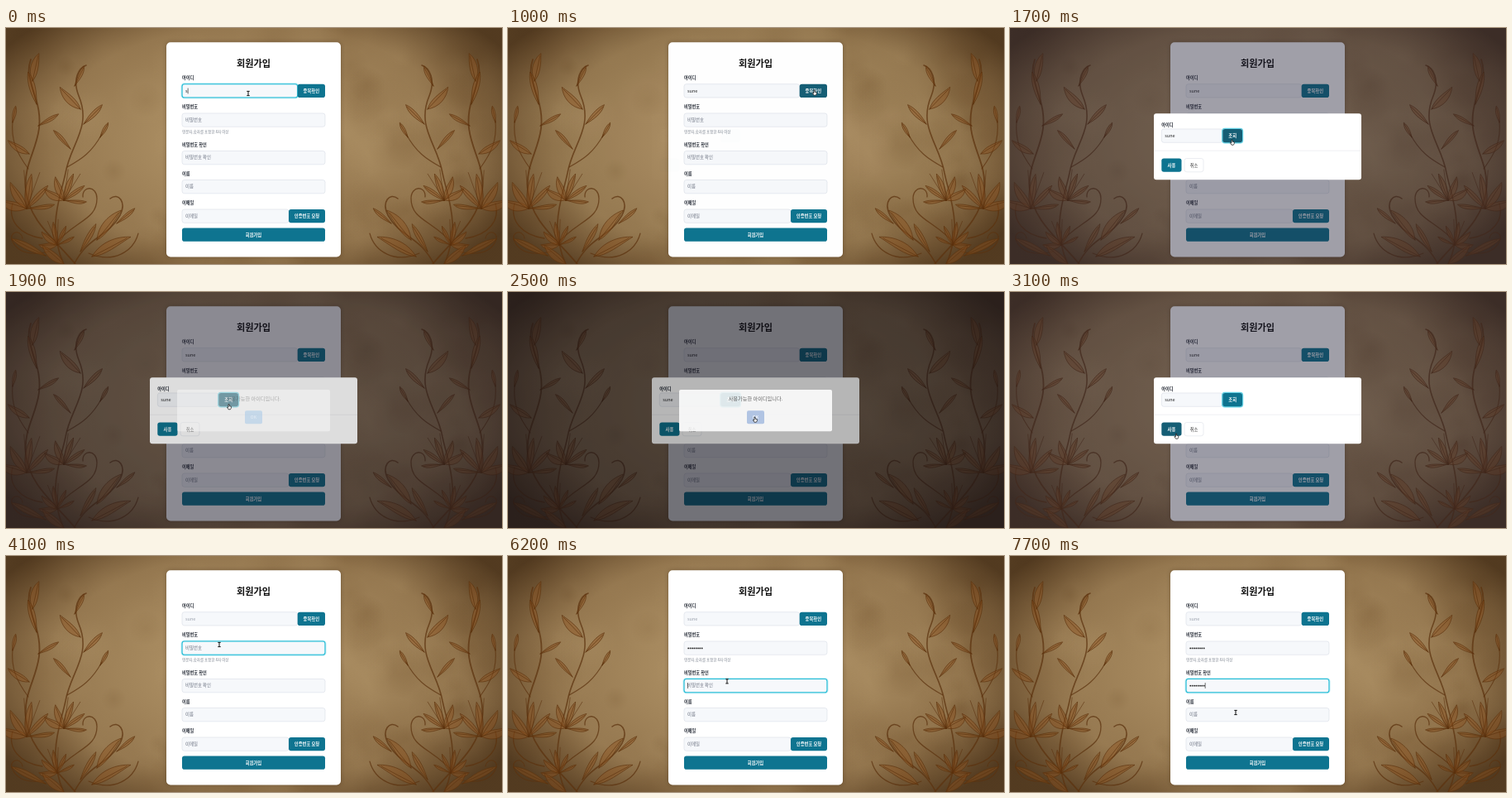
Recreate the animation shown at these times as an HTML page with a canvas. Size 600 by 285 pixels, loop 8 s.

```html
<!DOCTYPE html>
<html lang="ko">
<head>
<meta charset="utf-8">
<title>회원가입</title>
<style>
html, body { margin: 0; width: 100%; height: 100%; overflow: hidden; background: #8a6c45; }
canvas { display: block; width: 600px; height: 285px; }
</style>
</head>
<body>
<canvas id="stage"></canvas>
<script>
const W = 600, H = 285, LOOP = 8000;
const FONT = '"Noto Sans CJK KR", "Noto Sans CJK", "Noto Sans CJK JP", sans-serif';
const TEAL = '#0e7490', TEAL_DARK = '#155e75', CYAN = '#25bcd6';
const MEMBER = 'sune';

const scale = Math.max(1, window.devicePixelRatio || 1);
const stage = document.getElementById('stage');
stage.width = W * scale;
stage.height = H * scale;
const ctx = stage.getContext('2d');

const clamp = v => Math.max(0, Math.min(1, v));
const ramp = (t, a, b) => clamp((t - a) / (b - a));
const ease = p => p * p * (3 - 2 * p);
const countAt = (t, times) => times.filter(x => x <= t).length;

// ---------- parchment ----------
function leaf(g, x, y, deg, len, wide, bend = 0) {
  g.save();
  g.translate(x, y);
  g.rotate(deg * Math.PI / 180);
  g.beginPath();
  g.moveTo(0, 0);
  g.bezierCurveTo(len * .3, -wide + bend, len * .7, -wide + bend, len, bend);
  g.bezierCurveTo(len * .65, wide * .7 + bend, len * .3, wide * .7, 0, 0);
  g.fill();
  g.stroke();
  g.beginPath();
  g.moveTo(0, 0);
  g.quadraticCurveTo(len * .5, bend * .5, len * .9, bend);
  g.stroke();
  g.restore();
}

function lily(g, x, y, deg, size) {
  for (const d of [-62, 58, -32, 28, 0])
    leaf(g, x, y, deg + d, size * (1 - Math.abs(d) / 260), size * .15, d * size / 260);
  for (const d of [-12, 12]) {
    g.beginPath();
    g.moveTo(x, y);
    const a = (deg + d) * Math.PI / 180;
    g.lineTo(x + Math.cos(a) * size * 1.1, y + Math.sin(a) * size * 1.1);
    g.stroke();
  }
}

function vines(g) {
  const stem = (width, x, y, ...curve) => {
    g.lineWidth = width;
    g.beginPath();
    g.moveTo(x, y);
    for (let i = 0; i < curve.length; i += 6) g.bezierCurveTo(...curve.slice(i, i + 6));
    g.stroke();
  };
  g.lineCap = 'round';
  g.strokeStyle = 'rgba(92,50,14,.72)';
  g.fillStyle = 'rgba(140,82,30,.42)';
  stem(1.8, 88, 290, 60, 255, 28, 235, 24, 195, 20, 155, 52, 135, 36, 85, 30, 66, 24, 55, 30, 38);
  stem(1.6, 72, 290, 48, 240, 66, 205, 72, 175, 78, 140, 104, 120, 88, 82, 80, 62, 88, 48, 97, 45);
  stem(1.6, 80, 290, 98, 250, 122, 255, 138, 226, 146, 210, 136, 198, 126, 206);
  stem(1.3, 58, 262, 84, 232, 110, 232, 110, 206, 110, 190, 92, 190, 93, 204);
  stem(1.3, 44, 254, 16, 250, 2, 232, 8, 212);
  stem(1.2, 100, 272, 130, 285, 154, 270, 160, 248);
  stem(1.1, 74, 168, 92, 158, 104, 150, 116, 128);
  stem(1.1, 27, 170, 12, 150, 6, 135, 8, 112);
  stem(1.1, 52, 270, 30, 275, 15, 272, 8, 258, 2, 246, 18, 242, 20, 254);
  g.lineWidth = .8;
  lily(g, 25, 218, -82, 42);
  lily(g, 70, 208, -70, 34);
  lily(g, 62, 262, -100, 28);
  leaf(g, 37, 92, -112, 40, 7, 5);
  leaf(g, 32, 64, -70, 34, 6, -4);
  leaf(g, 39, 118, -40, 28, 5, 5);
  leaf(g, 28, 152, -140, 30, 5, -4);
  leaf(g, 90, 98, -125, 36, 6, -5);
  leaf(g, 94, 116, -55, 32, 6, 5);
  leaf(g, 83, 70, -78, 26, 5, 6);
  leaf(g, 78, 146, -142, 30, 5, 5);
  leaf(g, 114, 132, -70, 20, 4, 3);
  leaf(g, 110, 256, -42, 46, 6, -7);
  leaf(g, 104, 276, -18, 52, 6, -8);
  leaf(g, 134, 236, -50, 28, 5, 5);
  leaf(g, 90, 270, -68, 38, 6, 5);
  leaf(g, 48, 275, -160, 46, 7, 5);
  leaf(g, 70, 285, -132, 34, 6, -4);
  leaf(g, 8, 114, -88, 20, 4, 3);
}

function makePaper() {
  const c = document.createElement('canvas');
  c.width = stage.width;
  c.height = stage.height;
  const g = c.getContext('2d');
  g.scale(scale, scale);
  g.fillStyle = '#a88b60';
  g.fillRect(0, 0, W, H);
  let seed = 11;
  const rnd = () => (seed = seed * 16807 % 2147483647) / 2147483647;
  for (let i = 0; i < 150; i++) {
    const x = rnd() * W, y = rnd() * H, r = 12 + rnd() * 38;
    const tone = rnd() < .5 ? '85,52,18' : '200,172,125';
    const b = g.createRadialGradient(x, y, 0, x, y, r);
    b.addColorStop(0, `rgba(${tone},.1)`);
    b.addColorStop(1, `rgba(${tone},0)`);
    g.fillStyle = b;
    g.fillRect(x - r, y - r, 2 * r, 2 * r);
  }
  g.save();
  g.translate(300, 135);
  g.scale(1, .56);
  const v = g.createRadialGradient(0, 0, 110, 0, 0, 360);
  v.addColorStop(0, 'rgba(70,40,12,0)');
  v.addColorStop(.55, 'rgba(70,40,12,.2)');
  v.addColorStop(1, 'rgba(50,28,8,.72)');
  g.fillStyle = v;
  g.fillRect(-300, -300, 600, 640);
  g.restore();
  vines(g);
  g.translate(W, 0);
  g.scale(-1, 1);
  vines(g);
  return c;
}
const paper = makePaper();

// ---------- widgets ----------
function box(x, y, x2, y2, r, fill, line, width = .6) {
  ctx.beginPath();
  ctx.roundRect(x, y, x2 - x, y2 - y, r);
  if (fill) { ctx.fillStyle = fill; ctx.fill(); }
  if (line) { ctx.strokeStyle = line; ctx.lineWidth = width; ctx.stroke(); }
}

function text(s, x, y, size, color, weight = 500, align = 'left') {
  ctx.font = `${weight} ${size}px ${FONT}`;
  ctx.textAlign = align;
  ctx.textBaseline = 'alphabetic';
  ctx.fillStyle = color;
  ctx.fillText(s, x, y + size * .36);
  return ctx.measureText(s).width;
}

const label = (s, y, x = 213) => text(s, x, y, 5.2, '#1f2530', 600);

function button(s, x, y, x2, y2, hover, ring) {
  if (ring) box(x - .5, y - .5, x2 + .5, y2 + .5, 3.2, null, '#67d3e6', 1.5);
  box(x, y, x2, y2, 2.8, hover ? TEAL_DARK : TEAL);
  text(s, (x + x2) / 2, (y + y2) / 2, 5.3, '#fff', 700, 'center');
}

function field(y, x2, focus) {
  box(213, y, x2, y + 16.3, 2.8, '#f6f8fb', focus ? null : '#d9dee6');
  if (focus) {
    box(212.6, y - .4, x2 + .4, y + 16.7, 3.2, null, 'rgba(103,211,230,.35)', 2.4);
    box(213, y, x2, y + 16.3, 2.8, null, CYAN, 1.1);
  }
}

const hint = (s, y) => text(s, 217, y, 5.4, '#6b7280');

function caret(x, y) {
  ctx.fillStyle = '#111';
  ctx.fillRect(x, y - 3.4, .6, 6.8);
}

function secret(n, y, placeholder, focus, blink) {
  if (!n) hint(placeholder, y);
  ctx.fillStyle = '#111';
  for (let i = 0; i < n; i++) {
    ctx.beginPath();
    ctx.arc(218.2 + i * 2.35, y + .2, .85, 0, 7);
    ctx.fill();
  }
  if (focus && blink) caret(217 + n * 2.35, y);
}

function page(t) {
  ctx.drawImage(paper, 0, 0, W, H);
  ctx.save();
  ctx.shadowColor = 'rgba(30,15,0,.3)';
  ctx.shadowBlur = 5 * scale;
  box(194, 17.3, 405, 276.5, 5, '#fff');
  ctx.restore();
  text('회원가입', 299.5, 42.8, 11.2, '#111', 900, 'center');

  const idFocus = t < 1000, locked = t >= 3300;
  label('아이디', 60);
  field(67.7, 352.7, idFocus);
  const typed = MEMBER.slice(0, t < 100 ? 1 : t < 300 ? 3 : 4);
  const w = text(typed, 217, 76, 5.5, locked ? '#9aa1ac' : '#222');
  if (idFocus) caret(217.2 + w, 76);
  button('중복확인', 352.7, 67.7, 386, 84, t >= 850 && t < 1150, false);

  const pwFocus = t >= 3900 && t < 6050, againFocus = t >= 6050;
  label('비밀번호', 95);
  field(103, 386, pwFocus);
  secret(countAt(t, [4800, 4900, 5100, 5100, 5300, 5500, 5600, 5800]), 111.2,
    '비밀번호', pwFocus, t < 4100 || t >= 4700);
  text('영문자,숫자를 포함한 8자 이상', 213, 125.6, 4.5, '#7d8490');

  label('비밀번호 확인', 140.8);
  field(148.5, 386, againFocus);
  secret(countAt(t, [6400, 6600, 6700, 6900, 7100, 7400, 7500, 7600]), 156.5,
    '비밀번호 확인', againFocus, true);

  label('이름', 175.8);
  field(183.5, 386, false);
  hint('이름', 191.5);

  label('이메일', 211);
  field(219, 342, false);
  hint('이메일', 227);
  button('인증번호 요청', 342, 219, 386, 235.3);
  button('회원가입', 213, 241.5, 386, 257.8);
}

function modal(t) {
  const a = ramp(t, 1000, 1150) * (1 - ramp(t, 3150, 3300));
  if (!a) return;
  ctx.save();
  ctx.globalAlpha = a;
  ctx.fillStyle = 'rgba(30,28,48,.42)';
  ctx.fillRect(0, 0, W, H);
  box(174, 103.3, 425, 183.3, 3, '#fff');
  label('아이디', 117.5, 183.3);
  box(183.3, 122, 257, 138.3, 2.8, '#f6f8fb', '#d9dee6');
  text(MEMBER, 187.3, 130, 5.5, '#222');
  button('조회', 257.3, 122, 281, 138.3, t >= 1500 && t < 2000, t >= 1600);
  ctx.fillStyle = '#e3e6eb';
  ctx.fillRect(174, 147.8, 251, .6);
  button('사용', 183.3, 157.5, 207.5, 173.8, t >= 2800, false);
  box(211, 157.5, 234, 173.8, 2.8, '#fff', '#dde1e8');
  text('취소', 222.5, 165.6, 5.3, '#333', 500, 'center');
  ctx.restore();
}

function notice(t) {
  const a = ramp(t, 1800, 2050) * (1 - ramp(t, 2455, 2800));
  if (!a) return;
  ctx.save();
  ctx.globalAlpha = a;
  ctx.fillStyle = 'rgba(0,0,0,.33)';
  ctx.fillRect(0, 0, W, H);
  box(207, 118, 392, 168.3, 2, '#fff');
  text('사용가능한 아이디입니다.', 299.5, 128.3, 6.2, '#4a4a4a', 500, 'center');
  box(289, 143.3, 310, 159.3, 2, t > 2250 ? '#a6bce0' : '#8ebbe6');
  text('OK', 299.5, 151.3, 5, '#fff', 700, 'center');
  ctx.restore();
}

// ---------- pointer ----------
// start, end, x, y reached at the end
const MOVES = [
  [0, 0, 293, 79], [700, 950, 371, 78], [1100, 1600, 269, 138],
  [1850, 2300, 299, 154], [2500, 2850, 201.5, 174], [3250, 3800, 258, 107],
  [5800, 6150, 265, 151.3], [6400, 6700, 266, 151.3], [6900, 7200, 266.6, 151.3],
  [7400, 7700, 273, 189]
];

function pointer(t) {
  let x, y;
  for (const [from, to, nx, ny] of MOVES) {
    if (from > t) break;
    const p = from === to ? 1 : ease(ramp(t, from, to));
    x = x === undefined ? nx : x + (nx - x) * p;
    y = y === undefined ? ny : y + (ny - y) * p;
  }
  const overButton = t >= 850 && t < 1200 || t >= 1500 && t < 2000 ||
    t >= 2250 && t < 2600 || t >= 2800 && t < 3350;
  const overField = t < 820 || t >= 3700;
  if (overButton) hand(x, y);
  else if (overField) beam(x, y);
  else arrow(x, y);
}

function strokePath(points, close, fill) {
  ctx.beginPath();
  points.forEach(([x, y]) => ctx.lineTo(x, y));
  if (close) ctx.closePath();
  if (fill) { ctx.fillStyle = fill; ctx.fill(); }
  ctx.stroke();
}

function beam(x, y) {
  ctx.strokeStyle = '#111';
  ctx.lineWidth = 1;
  strokePath([[x, y - 2.6], [x, y + 2.6]]);
  for (const d of [-2.6, 2.6]) strokePath([[x - 1.7, y + d], [x + 1.7, y + d]]);
}

function hand(x, y) {
  ctx.strokeStyle = '#111';
  ctx.lineWidth = .7;
  strokePath([[x - 1, y - 3], [x, y - 3], [x + .2, y - .8], [x + 2.4, y - .2],
    [x + 2.2, y + 1.8], [x + 1.4, y + 3.2], [x - 1, y + 3.2], [x - 2.6, y + .6],
    [x - 1, y + .6]], true, '#fff');
}

function arrow(x, y) {
  ctx.strokeStyle = '#fff';
  ctx.lineWidth = .5;
  strokePath([[x - 1, y - 3], [x - 1, y + 3], [x + .4, y + 1.8], [x + 1.3, y + 3.6],
    [x + 2.1, y + 3.2], [x + 1.3, y + 1.4], [x + 3, y + 1.2]], true, '#111');
}

function draw(t) {
  ctx.setTransform(scale, 0, 0, scale, 0, 0);
  page(t);
  modal(t);
  notice(t);
  pointer(t);
}

const start = performance.now();
function tick() {
  draw((performance.now() - start) % LOOP);
  requestAnimationFrame(tick);
}
tick();
</script>
</body>
</html>
```
